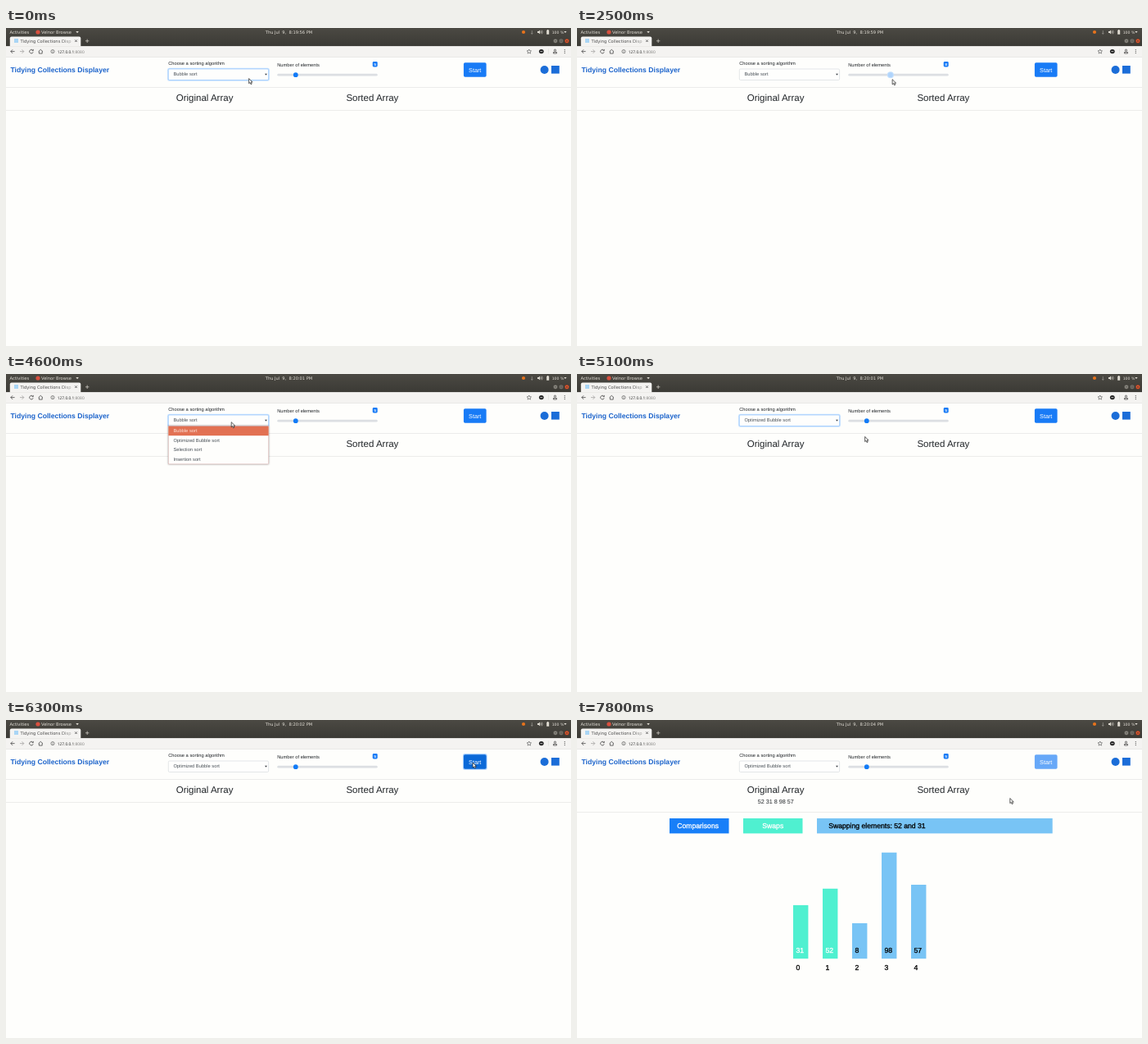
Animation, 690 px wide and 388 px high, one loop 8000 ms. Source, as an HTML page:

```html
<!DOCTYPE html>
<html lang="en">
<head>
<meta charset="utf-8">
<title>Tidying Collections Displayer</title>
<style>
  html, body { margin: 0; width: 100%; height: 100%; overflow: hidden; background: #fefefc; }
  svg { display: block; width: 100vw; height: 100vh; }
  text { font-family: "Liberation Sans", Arial, sans-serif; font-size: 5.75px; fill: #212529; white-space: pre; text-rendering: geometricPrecision; }
  .ui { font-family: "DejaVu Sans", sans-serif; font-size: 5.2px; fill: #e4e0d8; }
  .url { font-family: "Open Sans", sans-serif; font-size: 4.85px; fill: #222; }
  .mid { text-anchor: middle; }
  .h { font-size: 11.5px; }
  .heavy { font-size: 8.63px; stroke-width: .3; fill: #000; stroke: #000; }
  .light { fill: #fff; stroke: #fff; }
  .opt { fill: #495057; }
  .icon { fill: none; stroke: #4a4a4a; stroke-width: .8; }
  #menu { filter: drop-shadow(0 .5px 1.1px rgba(0, 0, 0, .45)); }
</style>
</head>
<body>
<svg viewBox="0 0 690 388" preserveAspectRatio="none">
  <defs>
    <linearGradient id="panel" x2="0" y2="1">
      <stop stop-color="#4b4943"/><stop offset="1" stop-color="#3b3a35"/>
    </linearGradient>
    <linearGradient id="fade">
      <stop offset=".8" stop-color="#4c4c4c"/><stop offset="1" stop-color="#b5b4b2"/>
    </linearGradient>
  </defs>

  <!-- desktop panel and tab strip -->
  <rect width="690" height="22.5" fill="url(#panel)"/>
  <text class="ui" x="4.5" y="6.9">Activities</text>
  <circle cx="39" cy="5" r="2.6" fill="#d9503f"/>
  <text class="ui" x="43" y="6.9">Velnor Browse</text>
  <path d="M85.3 4h3.6l-1.8 2.2z" fill="#dfdbd2"/>
  <text class="ui mid" id="clock" x="345.5" y="6.7" style="font-size:5.1px"></text>
  <circle cx="632" cy="5" r="2.1" fill="#e8731c"/>
  <path d="M642.3 3v4.4m-1.1-1.3l1.1 1.3 1.1-1.3" class="icon" style="stroke:#aaa79f;stroke-width:.6"/>
  <path d="M649 4h1.4l1.8-1.6v5.2l-1.8-1.6H649z" fill="#dfdbd2"/>
  <path d="M653.2 3.6q1 1.4 0 2.8M654.4 2.7q1.7 2.3 0 4.6" class="icon" style="stroke:#dfdbd2;stroke-width:.6"/>
  <path d="M660.2 2.8h.8v-.7h1.4v.7h.8v5h-3z" fill="#dfdbd2"/>
  <text class="ui" x="666.7" y="6.7" style="font-size:4.6px">100 %</text>
  <path d="M681.3 4h3.4l-1.7 2.1z" fill="#dfdbd2"/>

  <path d="M4.8 22.6V12.6q0-2 2-2H89.3q2 0 2 2v10z" fill="#f4f3f1"/>
  <rect x="10" y="13" width="5" height="5" fill="#a9d5f5"/>
  <text class="ui" x="17.5" y="17.7" style="fill:url(#fade)">Tidying Collections Disp</text>
  <path d="M84.2 14.4l2.6 2.6m0-2.6l-2.6 2.6" class="icon"/>
  <path d="M97 15.8h4.4m-2.2-2.2v4.4" class="icon" style="stroke:#c9c6bf"/>
  <g stroke="#2e2d29" stroke-width=".5">
    <circle cx="671" cy="15.8" r="2.7" fill="#8b8981"/>
    <circle cx="678" cy="15.8" r="2.7" fill="#8b8981"/>
    <circle cx="685" cy="15.8" r="2.8" fill="#e4572e"/>
  </g>
  <path d="M669.8 15.8h2.4M676.9 14.8h2.2v2h-2.2zM684 14.8l2 2m0-2l-2 2" class="icon" style="stroke:#33322e;stroke-width:.6"/>

  <!-- toolbar -->
  <rect y="22.2" width="690" height="13.2" fill="#f4f3f1"/>
  <rect y="35.1" width="690" height=".5" fill="#d6d5d2"/>
  <path d="M10.6 28.6H5.8m2.3-2.3l-2.3 2.3 2.3 2.3" class="icon"/>
  <path d="M17 28.6h4.8m-2.3-2.3l2.3 2.3-2.3 2.3" class="icon" style="stroke:#a5a4a2"/>
  <path d="M32.8 27.2a2.3 2.3 0 1 0 .4 2.1M33.3 25.9v1.8h-1.8" class="icon"/>
  <path d="M39.6 28.8l2.7-2.5 2.7 2.5M40.4 28.4v2.7h3.8v-2.7" class="icon"/>
  <circle cx="57" cy="28.6" r="2.1" class="icon" style="stroke-width:.6"/>
  <path d="M57 28.3v1.5m0-2.5v.6" class="icon" style="stroke-width:.6"/>
  <text class="url" x="62.8" y="30.5">127.0.0.1<tspan fill="#7d7c7a">:8080</tspan></text>
  <path d="M638.8 26l.8 1.7 1.9.2-1.4 1.3.4 1.9-1.7-1-1.7 1 .4-1.9-1.4-1.3 1.9-.2z" class="icon" style="stroke-width:.6"/>
  <ellipse cx="653.8" cy="28.6" rx="2.9" ry="2.6" fill="#222"/>
  <path d="M652.3 28.7h3" stroke="#eee" stroke-width=".8"/>
  <rect x="662.3" y="25.5" width=".4" height="6" fill="#cfcecb"/>
  <circle cx="670.5" cy="27.2" r="1.1" class="icon"/>
  <path d="M668.5 31v-1.6h4V31z" class="icon"/>
  <g fill="#4a4a4a"><circle cx="682.3" cy="26.6" r=".6"/><circle cx="682.3" cy="28.6" r=".6"/><circle cx="682.3" cy="30.6" r=".6"/></g>

  <!-- page header -->
  <text x="5.5" y="54" style="font-size:8.63px;font-weight:bold;fill:#1b63cb">Tidying Collections Displayer</text>
  <text x="198.2" y="44.6">Choose a sorting algorithm</text>
  <text x="331.2" y="47.1">Number of elements</text>
  <rect id="ring" x="197" y="48.8" width="124.9" height="16" rx="2.4" fill="#c8e2ff"/>
  <rect id="box" x="198.3" y="50" width="122.3" height="13.5" rx="1.4" fill="#fefefd" stroke-width=".5"/>
  <text id="choice" class="opt" x="204.4" y="58.4"></text>
  <path d="M316.1 55.8h2.8l-1.4 1.9z" fill="#343a40"/>
  <rect x="447.7" y="41" width="6" height="6.5" rx="1.4" fill="#187bf6"/>
  <text id="count" class="mid" x="450.7" y="45.8" style="font-size:4.3px;font-weight:bold;fill:#fff"></text>
  <rect x="331.3" y="55.7" width="122.4" height="2.9" rx="1.45" fill="#dcdfe3"/>
  <g id="thumb">
    <circle id="halo" r="4.05" fill="#c4e0fd"/>
    <circle id="knob" r="2.9"/>
  </g>
  <g id="start">
    <rect id="press" x="557.9" y="41.1" width="29.7" height="19.7" rx="2.6" fill="#a9d0ff"/>
    <rect id="btn" x="558.9" y="42.2" width="27.7" height="17.5" rx="1.8"/>
    <text class="mid" x="572.7" y="53.6" style="font-size:7.19px;fill:#fff">Start</text>
  </g>
  <circle cx="657.6" cy="51" r="5" fill="#1b6dd8"/>
  <rect x="666" y="46" width="9.8" height="9.6" fill="#1b6dd8"/>
  <rect y="72" width="690" height=".6" fill="#e2e2e1"/>

  <text class="mid h" x="242.6" y="89.2">Original Array</text>
  <text class="mid h" x="447.4" y="89.2">Sorted Array</text>
  <rect id="rule" width="690" height=".6" fill="#e2e2e1"/>

  <g id="work">
    <text class="mid" x="242.7" y="101.8" style="font-size:7.19px">52 31 8 98 57</text>
    <rect x="113" y="120" width="72.5" height="18.4" fill="#187ff8"/>
    <text class="mid heavy light" x="147.6" y="132.4">Comparisons</text>
    <rect x="203" y="120" width="72.5" height="18.4" fill="#4ff0d0"/>
    <text class="mid heavy light" x="239.3" y="132.4">Swaps</text>
    <rect x="293" y="120" width="287.7" height="18.4" fill="#78c4f5"/>
    <text id="note" class="heavy" x="307.2" y="132.4"></text>
    <g id="bars"></g>
  </g>

  <g id="menu"></g>
  <path id="cursor" d="M0 0v6.1l1.4-1.2 1 2.2 1.2-.5-1-2.2h1.9z" fill="#f4f4f2" stroke="#222" stroke-width=".7" stroke-linejoin="round"/>
</svg>
<script>
const $ = id => document.getElementById(id);
const LOOP = 8000, STEP = 100;
const OPTIONS = ["Bubble sort", "Optimized Bubble sort", "Selection sort", "Insertion sort"];

// time, x, y of the pointer tip
const POINTER = [
  [0, 296.6, 61.6], [100, 296.6, 61.6], [400, 318, 61], [700, 318, 61], [1200, 341, 60],
  [1300, 341, 60], [1800, 354.5, 60], [1900, 354.5, 60], [2500, 385.1, 62.7], [2600, 385.1, 62.7],
  [3500, 353.2, 62.3], [3700, 352.8, 62.3], [3800, 352.3, 61.4], [3900, 352.3, 61.4],
  [4400, 275.2, 58.7], [4700, 275.2, 58.7], [4800, 277, 84], [4900, 277, 84],
  [5400, 489, 62.5], [5500, 489, 62.5], [5600, 491.2, 61.8], [6000, 570, 52], [6400, 570, 52],
  [6900, 528.8, 95.5], [LOOP, 528.8, 95.5]
];
// time, slider value
const VALUES = [[0, 5], [2000, 5], [2500, 8], [2600, 8], [3500, 5], [LOOP, 5]];
const OPEN = 4400, PICK = 5000, RUN = 6400, SWAP = 7400;

const smooth = u => u * u * (3 - 2 * u);
function track(keys, t, col, ease = u => u) {
  const i = Math.max(1, keys.findIndex(k => k[0] >= t));
  const a = keys[i - 1], b = keys[i];
  return a[col] + (b[col] - a[col]) * ease((t - a[0]) / (b[0] - a[0]));
}
const within = (t, a, b) => t >= a && t < b;
const show = (id, on) => $(id).setAttribute("display", on ? "inline" : "none");
const paint = (id, color) => $(id).setAttribute("fill", color);

function put(id, text) {
  if ($(id).textContent !== text) $(id).textContent = text;
}

function clockText(t) {
  const s = 19 * 60 + 56 + Math.floor((t + 600) / 1000);
  const two = n => String(n).padStart(2, "0");
  return `Thu Jul  9,  8:${two(Math.floor(s / 60))}:${two(s % 60)} PM`;
}

function drawMenu(active) {
  const rows = OPTIONS.map((name, i) => {
    const y = 63.7 + i * 11.5;
    const on = i === active;
    const bg = on ? `<rect x="198.4" y="${y}" width="122.2" height="11.5" fill="#e27153"/>` : "";
    return `${bg}<text class="opt" x="204.4" y="${y + 7.5}"${on ? ' style="fill:#fbe3da"' : ""}>${name}</text>`;
  });
  $("menu").innerHTML = `<rect x="198.3" y="63.5" width="122.4" height="46.4" fill="#fefefc" stroke="#d9a3a0" stroke-width=".4"/>` + rows.join("");
}

function drawBars(values, hot) {
  $("bars").innerHTML = values.map((v, i) => {
    const x = 264 + 36 * i, h = 35.6 + .958 * v, on = i < 2;
    return `<rect x="${x}" y="${291.2 - h}" width="18.4" height="${h}" fill="${on ? hot : "#78c4f5"}"/>
      <text class="heavy${on ? " light" : ""}" x="${x + 3.5}" y="283.7">${v}</text>
      <text class="heavy" x="${x + 3.5}" y="305.2">${i}</text>`;
  }).join("");
}

function render(t) {
  put("clock", clockText(t));
  const x = track(POINTER, t, 1, smooth), y = track(POINTER, t, 2, smooth);
  $("cursor").setAttribute("transform", `translate(${x} ${y})`);

  const focus = t < 2000 || within(t, OPEN, 6200);
  show("ring", focus);
  $("box").setAttribute("stroke", focus ? "#72b2fa" : "#c9ced4");
  put("choice", OPTIONS[t < PICK ? 0 : 1]);
  const open = within(t, OPEN, PICK);
  show("menu", open);
  if (open) drawMenu(t < 4800 ? 0 : 1);

  const value = Math.round(track(VALUES, t, 1));
  put("count", String(value));
  $("thumb").setAttribute("transform", `translate(${334.4 + (value - 3) * 9.69} 57.2)`);
  show("halo", within(t, 2000, OPEN));
  paint("knob", within(t, 2000, 3500) ? "#b0d4fb" : "#127bf7");

  const running = t >= RUN;
  paint("btn", within(t, 5900, RUN) ? "#0b69d8" : "#187bf6");
  show("press", within(t, 6200, RUN));
  $("start").setAttribute("opacity", 1 - .35 * Math.min(1, Math.max(0, (t - RUN) / 150)));
  $("rule").setAttribute("y", running ? 112.1 : 100.2);
  show("work", running);
  if (running) {
    const swapped = t >= SWAP;
    put("note", `${swapped ? "Swapping" : "Comparing"} elements: 52 and 31`);
    drawBars(swapped ? [31, 52, 8, 98, 57] : [52, 31, 8, 98, 57], swapped ? "#4ff0d0" : "#187ff8");
  }
}

const begin = performance.now();
let last = -1;
function tick() {
  const t = Math.floor((performance.now() - begin) % LOOP / STEP) * STEP;
  if (t !== last) render(last = t);
  requestAnimationFrame(tick);
}
tick();
</script>
</body>
</html>
```
